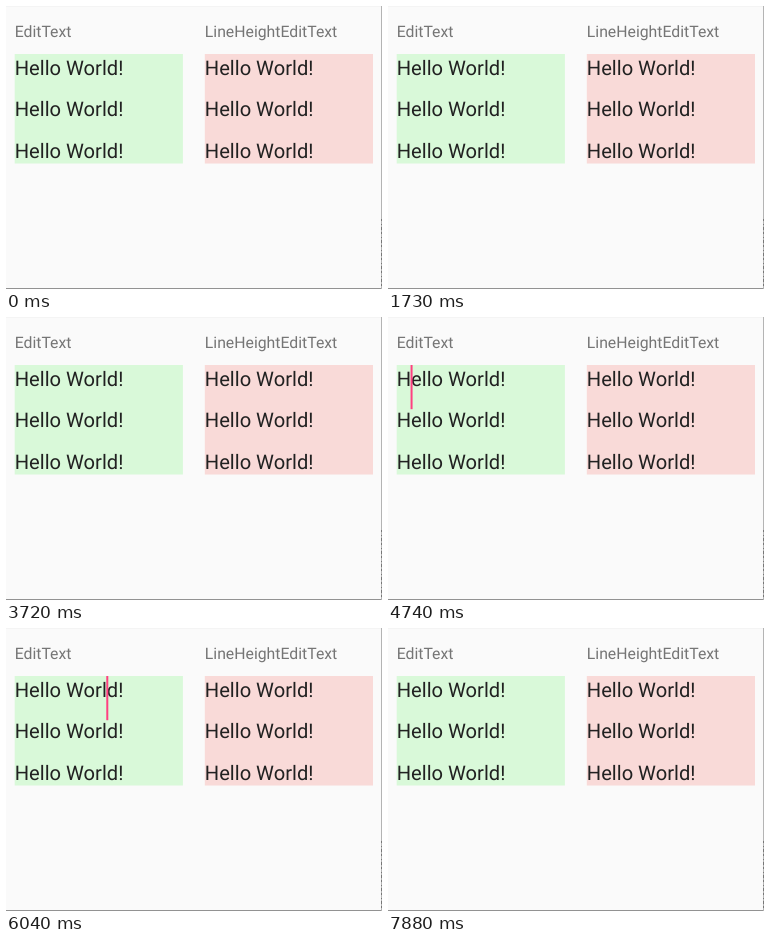
Write an HTML page that moves like this. It is 376 by 283 pixels and loops after 8 s.

```html
<!DOCTYPE html>
<html lang="en">
<head>
<meta charset="utf-8">
<title>EditText cursor</title>
<style>
  html, body { margin: 0; width: 100%; height: 100%; overflow: hidden; background: #fafafa; }
  svg { display: block; width: 376px; height: 283px; }
  text { font-family: Roboto, sans-serif; text-rendering: geometricPrecision; }
  .label { font-size: 15.8px; fill: #757575; }
  .line { font-size: 20.15px; fill: #212121; }
</style>
</head>
<body>
<svg viewBox="0 0 376 283">
  <rect width="376" height="283" fill="#fafafa"/>
  <rect width="376" height="1" fill="#f4f4f4"/>
  <rect y="282" width="376" height="1" fill="#929292"/>
  <rect x="375" width="1" height="283" fill="#b4b4b4"/>
  <path d="M375.5 213V283" stroke="#777" stroke-dasharray="2 3 1 2 3 2"/>
  <g id="fields"></g>
  <rect id="cursor" width="2" fill="#ff4081"/>
</svg>
<script>
const LOOP = 8000;
const TOP = 48, BOTTOM = 157.5, LINE_HEIGHT = 41.45;
const BLINK_START = 242, BLINK = 496;
const MOVE_START = 4740, MOVE = 144;
const SECOND_LINE = 6770, THIRD_LINE = 6950, BACK_UP = 7390, HIDE = 7880;
const TEXT = 'Hello World!';

const fields = document.getElementById('fields');
const cursor = document.getElementById('cursor');

function add(tag, attributes, content = '') {
  const node = document.createElementNS('http://www.w3.org/2000/svg', tag);
  for (const key in attributes) node.setAttribute(key, attributes[key]);
  node.textContent = content;
  fields.append(node);
  return node;
}

function addField(x, label, fill) {
  add('text', { x, y: 30.9, class: 'label' }, label);
  add('rect', { x, y: TOP, width: 168.2, height: BOTTOM - TOP, fill });
  for (let row = 0; row < 3; row++) {
    add('text', { x, y: 68.9 + row * LINE_HEIGHT, class: 'line' }, TEXT);
  }
}

addField(8.7, 'EditText', '#d9f9d9');
addField(198.8, 'LineHeightEditText', '#f9dad8');
const line = fields.querySelector('.line');

function caretX(column) {
  const x = column < TEXT.length
    ? line.getStartPositionOfChar(column).x
    : line.getEndPositionOfChar(column - 1).x;
  return x - 0.5;
}

const caretBottom = row => Math.min(BOTTOM, 92.2 + row * LINE_HEIGHT);
const caretTop = row => row ? caretBottom(row - 1) - 0.6 : TOP;

function isVisible(time) {
  if (time >= MOVE_START) return time < HIDE;
  return time >= BLINK_START && Math.floor((time - BLINK_START) / BLINK) % 2 === 0;
}

function columnAt(time) {
  const moves = Math.floor((time - MOVE_START) / MOVE) + 1;
  return Math.max(0, Math.min(TEXT.length, moves));
}

function rowAt(time) {
  if (time < SECOND_LINE) return 0;
  return time >= THIRD_LINE && time < BACK_UP ? 2 : 1;
}

const start = performance.now();

function draw() {
  const time = Math.max(0, performance.now() - start) % LOOP;
  const row = rowAt(time);
  cursor.setAttribute('visibility', isVisible(time) ? 'visible' : 'hidden');
  cursor.setAttribute('x', caretX(columnAt(time)));
  cursor.setAttribute('y', caretTop(row));
  cursor.setAttribute('height', caretBottom(row) - caretTop(row));
  requestAnimationFrame(draw);
}
draw();
</script>
</body>
</html>
```
